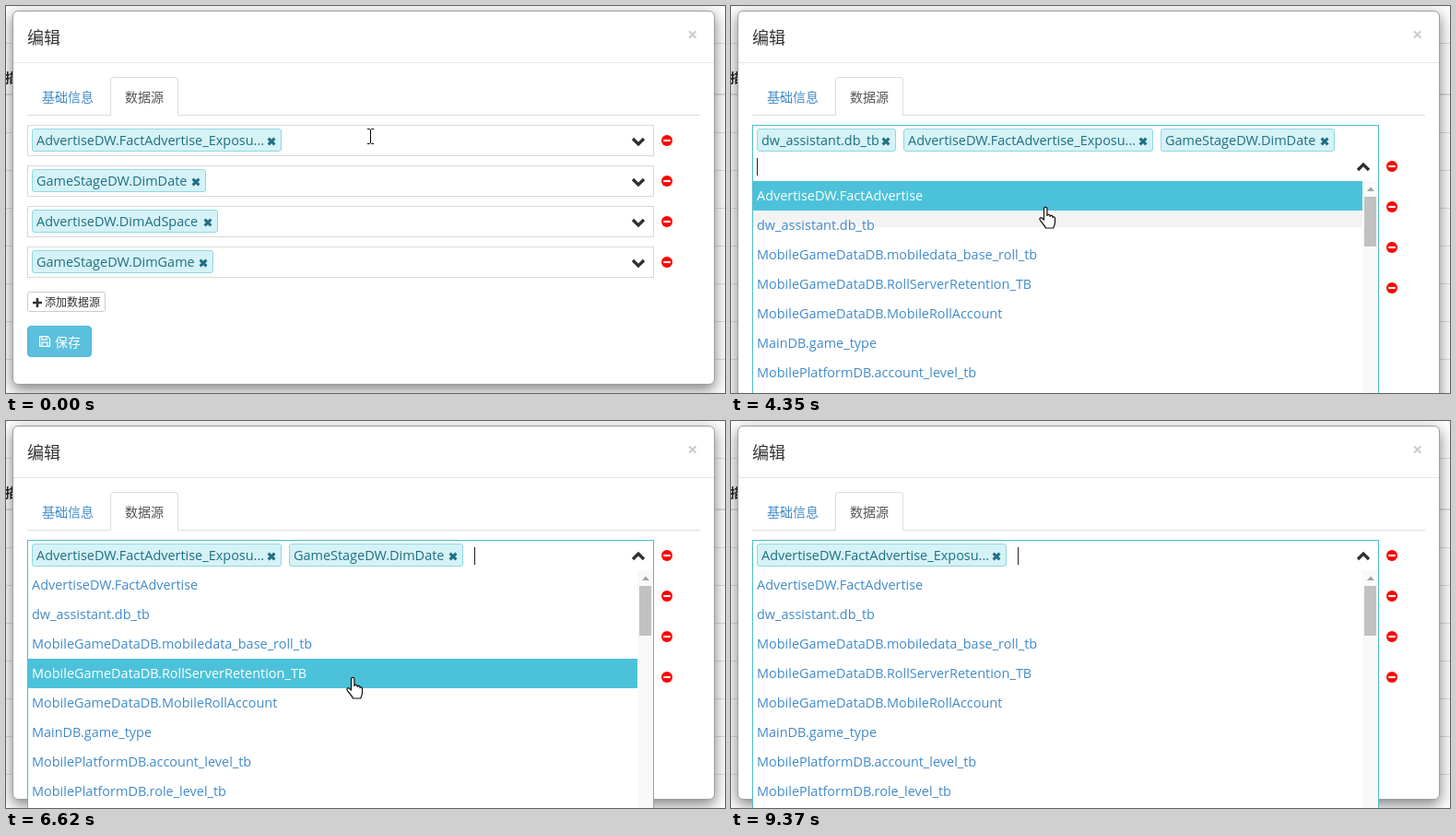
Recreate the animation shown at these times as an HTML page. Size 780x420 px, loop 9650 ms.

```html
<!DOCTYPE html>
<html lang="zh">
<head>
<meta charset="utf-8">
<title>编辑</title>
<style>
html, body { margin: 0; width: 100%; height: 100%; overflow: hidden; background: #fff; }
#stage { position: relative; width: 780px; height: 420px; overflow: hidden; background: #fdfdfd;
  font: 14.45px "Open Sans", "Noto Sans CJK SC", "Noto Sans CJK", sans-serif; color: #333; }
#stage div, #stage svg, #stage span { position: absolute; box-sizing: border-box; white-space: pre; }
.cjk { font-family: "Noto Sans CJK SC", "Noto Sans CJK", sans-serif; font-size: 14px; line-height: 20px; }
.line { left: 0; width: 780px; height: 1px; background: #ddd; }
#modal { left: 7px; top: 5px; width: 762px; background: #fff; border: 1px solid #a0a0a0; border-radius: 6px;
  box-shadow: 0 5px 15px rgba(0,0,0,.5); }
.box { left: 23px; width: 680px; border: 1px solid #d9d9d9; background: #fff; }
.box.open { border-color: #4cbccb; }
.chip { height: 25px; padding-left: 4px; line-height: 23px; background: #d5f2f7; border: 1px solid #8fd8e2;
  border-radius: 3px; color: #1f6f83; }
.chip svg { right: 5px; top: 8px; }
.opt { left: 24px; height: 32px; padding-left: 4px; line-height: 32px; color: #428bca; }
.opt.on { background: #4cc2da; color: #fff; }
.caret { width: 1px; height: 19px; background: #222; }
.btn { border: 1px solid #ccc; border-radius: 3px; background: #fff; }
svg { overflow: visible; }
</style>
</head>
<body>
<div id="stage">
  <div id="page"></div>
  <div id="modal"></div>
  <div style="left:8px;top:61px;width:760px;height:1px;background:#e5e5e5"></div>
  <div class="cjk" style="left:23px;top:20px;font-size:18px;line-height:26px">编辑</div>
  <div style="left:739px;top:17px;font-size:20px;font-weight:bold;line-height:28px;color:#ccc">×</div>
  <div style="left:23px;top:118px;width:730px;height:1px;background:#ddd"></div>
  <div style="left:113px;top:77px;width:74px;height:42px;background:#fff;border:1px solid #ddd;border-bottom:0;border-radius:4px 4px 0 0"></div>
  <div class="cjk" style="left:39px;top:88px;color:#428bca">基础信息</div>
  <div class="cjk" style="left:129px;top:88px;color:#555">数据源</div>
  <div id="form"></div>
  <div id="mouse"></div>
</div>
<script>
const LOOP = 9650, ROW = 32;
const $ = id => document.getElementById(id);

const CHIPS = {
  expo: ['AdvertiseDW.FactAdvertise_Exposu...', 271],
  date: ['GameStageDW.DimDate', 189],
  space: ['AdvertiseDW.DimAdSpace', 202],
  game: ['GameStageDW.DimGame', 197],
  dw: ['dw_assistant.db_tb', 151],
  mob: ['MobileGameDataDB.mobiledata_base...', 289]
};
const dims = ['GameStageDW.DimDate', 'AdvertiseDW.DimAdSpace', 'GameStageDW.DimGame'];
const users = ['AdvertiseDW.DimAdvertiseIpUser', 'AdvertiseDW.DimAdvertiseIpUser', 'AdvertiseDW.DimAdvertiseCookieUser'];
const LISTS = {
  all: ['AdvertiseDW.FactAdvertise', 'dw_assistant.db_tb', 'MobileGameDataDB.mobiledata_base_roll_tb',
    'MobileGameDataDB.RollServerRetention_TB', 'MobileGameDataDB.MobileRollAccount', 'MainDB.game_type',
    'MobilePlatformDB.account_level_tb', 'MobilePlatformDB.role_level_tb'],
  di: ['MobileGameDataDB.recharge_amount_distribution_tb', ...dims,
    'AdvertiseDW.FactAdvertise_KeyWord_Media_Report', ...users],
  dim: [...dims, ...users, 'AdvertiseDW.DimMedia', 'AdvertiseDW.DimChannel']
};

const beam = (x, y) => ({ mouse: ['beam', x, y] });
const hand = (x, y) => ({ mouse: ['hand', x, y] });
const arrow = (x, y) => ({ mouse: ['arrow', x, y] });
const chips = s => ({ chips: s.split(' ') });

// Each step changes only what it names.
const STEPS = [
  [0, { open: false, caret: false, query: '', list: 'all', ghost: false, ...chips('expo'), ...beam(395, 141) }],
  [400, { open: true, caret: true }],
  [960, { caret: false }],
  [1210, { caret: true, query: 'd' }],
  [1330, { query: 'di', list: 'di' }],
  [1610, { query: 'dim', list: 'dim' }],
  [2170, { caret: false }],
  [2290, beam(395, 147)],
  [2440, hand(420, 169)],
  [2810, { caret: true, query: '', list: 'all', ...chips('expo date') }],
  [3090, hand(490, 166)],
  [3210, beam(536, 153)],
  [3330, hand(500, 165)],
  [3450, hand(450, 174)],
  [3570, hand(390, 182)],
  [3720, hand(355, 200)],
  [3840, hand(345, 212)],
  [3960, chips('dw expo date')],
  [4080, hand(342, 216)],
  [4200, hand(342, 226)],
  [4350, { ghost: true, ...hand(341, 218) }],
  [4470, { ghost: false, ...hand(345, 228) }],
  [4620, hand(350, 245)],
  [4740, hand(360, 262)],
  [4860, hand(362, 275)],
  [4980, chips('dw mob expo date')],
  [5260, hand(365, 290)],
  [5380, hand(366, 298)],
  [5530, hand(366, 268)],
  [5680, hand(366, 247)],
  [5830, chips('mob expo date')],
  [6230, hand(372, 275)],
  [6350, hand(376, 295)],
  [6470, hand(376, 278)],
  [6620, chips('expo date')],
  [6740, hand(420, 255)],
  [6860, hand(470, 225)],
  [6980, hand(515, 195)],
  [7100, hand(545, 168)],
  [7250, hand(556, 162)],
  [7370, beam(565, 150)],
  [7490, beam(572, 140)],
  [8050, { caret: false }],
  [8300, { caret: true, ...chips('expo') }],
  [8830, { caret: false }],
  [8980, hand(632, 215)],
  [9100, arrow(700, 320)],
  [9220, { caret: true, ...arrow(752, 411) }],
  [9370, { mouse: null }]
];
let last = {};
const states = STEPS.map(([, change]) => last = { ...last, ...change });

const div = (cls, x, y, w, h, css = '', html = '') =>
  `<div class="${cls}" style="left:${x}px;top:${y}px;${w ? `width:${w}px;` : ''}${h ? `height:${h}px;` : ''}${css}">${html}</div>`;
const svg = (x, y, body) => `<svg width="1" height="1" style="left:${x}px;top:${y}px">${body}</svg>`;

const CROSS = '<svg width="10" height="10"><path d="M1.6 1.6l6.8 6.8M8.4 1.6l-6.8 6.8" stroke="#1f6f83" stroke-width="2.9"/></svg>';
const chip = (name, x, y) => div('chip', x, y, CHIPS[name][1], 0, '', CHIPS[name][0] + CROSS);
const chevron = (y, up) => svg(686, y,
  `<path d="M-6 ${up ? 3 : -3}L0 ${up ? -3 : 3}L6 ${up ? 3 : -3}" fill="none" stroke="#2b2f33" stroke-width="3.2"/>`);
const minus = y => svg(717, y, '<circle r="6" fill="#f00"/><path d="M-3.7 0h7.4" stroke="#fff" stroke-width="2.2"/>');

const CURSORS = {
  beam: [3, 8, '<path d="M0 .5h2.5l1 1 1-1H7M3.5 1v15M0 16.5h2.5l1-1 1 1H7" fill="none" stroke="#000"/>'],
  hand: [7, 1, '<path d="M5.5 15V3a1.7 1.7 0 0 1 3.4 0v7.5c0-1.6 3.2-1.5 3.2.3v.7c0-1.5 2.9-1.4 2.9.4v.8c.2-1.2 2.5-1 2.5.6v4.7c0 3-1.5 3.5-1.7 6H7.3C7 21.5 2.5 18 1 14.7c-.7-1.7 1.3-2.6 2.4-1.4z" fill="#fff" stroke="#111" stroke-width="1.2" stroke-linejoin="round"/>'],
  arrow: [0, 0, '<path d="M.5.5v15l3.4-3.2 2.3 5.3 2-.9-2.3-5.2h4.6z" fill="#fff" stroke="#111"/>']
};

// Places the chips in lines and returns where typing goes on.
function flow(names) {
  let x = 28, line = 0, html = '';
  const wrap = right => { if (right > 670) { x = 28; line++; } };
  for (const name of names) {
    const w = CHIPS[name][1];
    wrap(x + w);
    html += chip(name, x, 133 + 28 * line);
    x += w + 8;
  }
  wrap(x + 40);
  return { html, line, x: x > 28 ? x + 4 : x };
}

function options(s, top) {
  const full = s.list === 'all', width = full ? 661 : 678;
  const [kind, , y] = s.mouse || [];
  const hover = kind === 'hand' ? Math.floor((y - top) / ROW) : -1;
  let html = s.ghost ? div('', 24, top + ROW, width, 18, 'background:#f3f3f3') : '';
  LISTS[s.list].forEach((text, i) => {
    html += div(i === hover ? 'opt on' : 'opt', 24, top + i * ROW, width, 0, '', text);
  });
  if (full) {
    html += div('', 685, top, 17, 300, 'background:#f9f9f9') +
      div('', 687, top + 17, 13, 54, 'background:#c1c1c1') +
      svg(693.5, top + 6, '<path d="M-4 5L0 .5 4 5z" fill="#a3a3a3"/>');
  }
  return html;
}

function form(s) {
  const { html, line, x } = flow(s.chips), shift = 28 * line;
  let out = '';
  ['', 'date', 'space', 'game'].forEach((name, i) => {
    const y = 129 + 44 * i + (i ? shift : 0);
    out += minus(146 + 44 * i + shift);
    if (i) out += div('box', 23, y, 0, 34) + chip(name, 28, y + 4) + chevron(y + 18);
  });
  out += div('btn', 23, 310 + shift, 85, 22) +
    svg(34, 321.5 + shift, '<path d="M-5 0H5M0-5V5" stroke="#333" stroke-width="2.6"/>') +
    div('cjk', 42, 311 + shift, 0, 0, 'font-size:12px', '添加数据源') +
    div('btn', 23, 347 + shift, 70, 34, 'background:#5bc0de;border-color:#46b8da;border-radius:4px') +
    svg(36, 358 + shift, '<path d="M.6.6h8.6l2.3 2.3v8.5H.6zM3 .6v3.6h5V.6M3 11.4V7.2h6v4.2" fill="none" stroke="#fff" stroke-width="1.2"/>') +
    div('cjk', 53, 354 + shift, 0, 0, 'color:#fff', '保存');
  out += div(s.open ? 'box open' : 'box', 23, 129, 0, s.open ? 320 : 34) + html + chevron(147 + shift, s.open);
  if (s.open) {
    const mark = s.caret ? '<span class="caret" style="right:-1px;top:4px"></span>' : '';
    out += options(s, 162 + shift) + div('', x, 133 + shift, 0, 25, 'line-height:25px', s.query + mark);
  }
  $('modal').style.height = 406 + shift + 'px';
  return out;
}

function cursor([kind, x, y]) {
  const [dx, dy, body] = CURSORS[kind];
  return svg(x - dx, y - dy, body);
}

let page = div('line', 0, 40, 0, 0) + div('line', 0, 95, 0, 2) +
  div('cjk', -1, 67, 0, 0, 'font-weight:bold;color:#222', '描述');
for (let y = 137; y < 420; y += 41) page += div('line', 0, y, 0, 0);
$('page').innerHTML = page;

let shown = -1;
const start = performance.now();
function draw() {
  const t = (performance.now() - start) % LOOP;
  let i = STEPS.length - 1;
  while (STEPS[i][0] > t) i--;
  if (i !== shown) {
    const s = states[shown = i];
    $('form').innerHTML = form(s);
    $('mouse').innerHTML = s.mouse ? cursor(s.mouse) : '';
  }
  requestAnimationFrame(draw);
}
draw();
</script>
</body>
</html>
```
